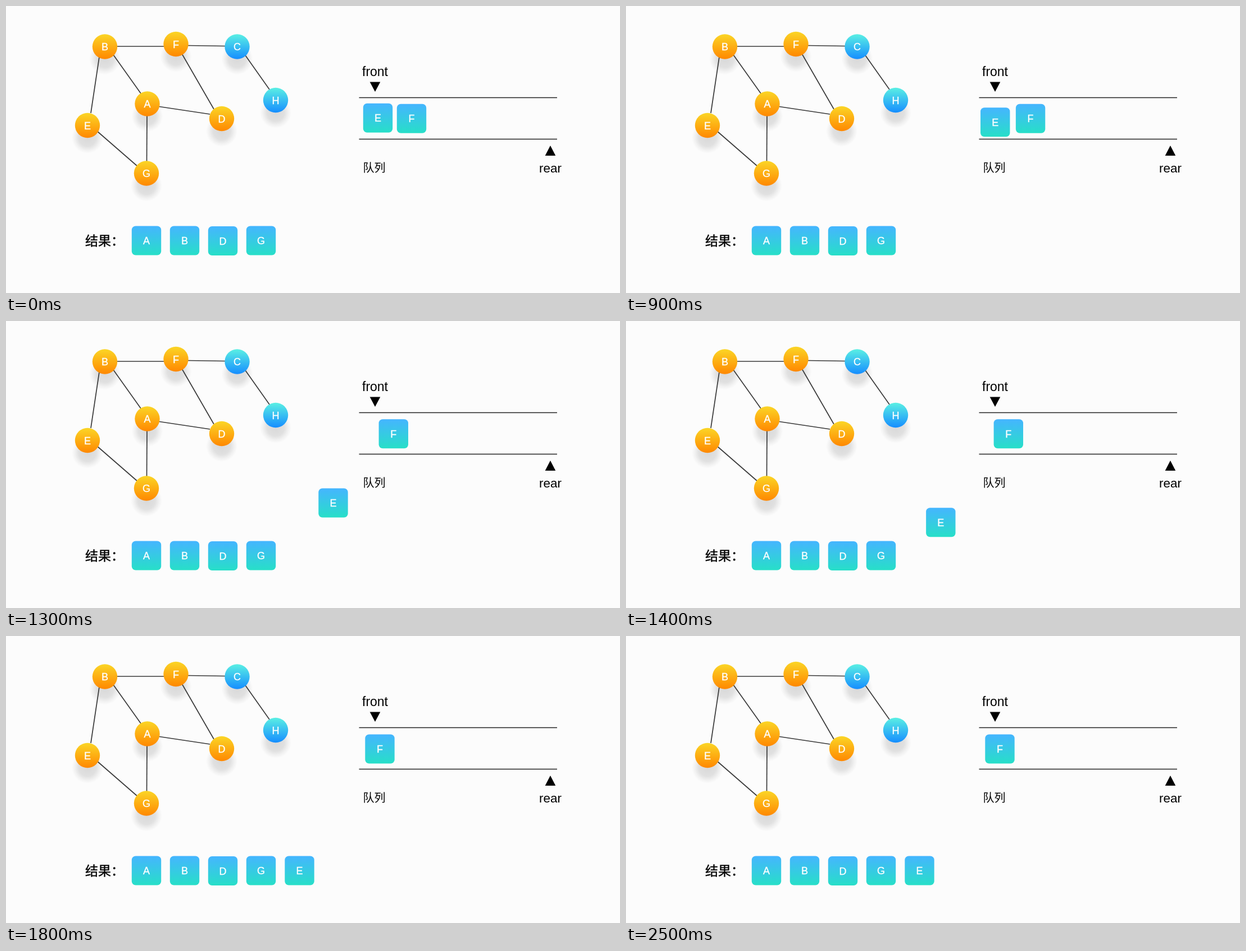
Animation, 1093 px wide and 512 px high, one loop 2.6 s. Source, as an HTML page with a canvas:

```html
<!DOCTYPE html>
<html lang="zh">
<head>
<meta charset="utf-8">
<title>BFS queue</title>
<style>
html, body { margin: 0; width: 100%; height: 100%; overflow: hidden; background: #fcfcfc; }
canvas { display: block; width: 1093px; height: 512px; }
</style>
</head>
<body>
<canvas id="stage" width="1093" height="512"></canvas>
<script>
const ctx = document.getElementById('stage').getContext('2d');
const LOOP = 2600, STEP = 100;
const MOVE_START = 789, MOVE_TIME = 938;
const LATIN = '"Liberation Sans", Arial, sans-serif';
const CJK = '"Noto Sans CJK SC", "Noto Sans CJK", sans-serif';
const ORANGE = ['#fbd526', '#ff8800'];
const BLUE = ['#5aefe4', '#168eff'];
const TILE = ['#45b5ff', '#27dfc8'];

const nodes = [
  ['B', 176, 72.5, ORANGE], ['F', 302.5, 68, ORANGE], ['C', 411.5, 72.5, BLUE],
  ['A', 251.5, 174.5, ORANGE], ['H', 480, 168, BLUE], ['D', 384, 201, ORANGE],
  ['E', 145, 213, ORANGE], ['G', 250, 298.5, ORANGE]
];
const edges = [
  [198, 72, 281, 72], [324, 70.5, 390, 71.5], [426, 88, 469, 149],
  [313, 85, 370, 184], [191, 87, 240, 156], [273, 179.5, 363, 193],
  [166, 91, 151, 191], [163, 224, 233, 285], [251, 196, 250.5, 277]
];
const results = [['A', 250, 418.5], ['B', 318, 418.5], ['D', 386, 419], ['G', 454, 418.5]];
const movers = [
  ['F', [722, 200.8], [665.5, 201.5]],
  ['E', [662, 199.8], [522.5, 418.5]]
];

function vertical([top, bottom], y, half) {
  const g = ctx.createLinearGradient(0, y - half, 0, y + half);
  g.addColorStop(0, top);
  g.addColorStop(1, bottom);
  return g;
}

function label(text, x, y, font, color, align, weight = 0) {
  ctx.font = font;
  ctx.textAlign = align;
  ctx.fillStyle = ctx.strokeStyle = color;
  ctx.fillText(text, x, y);
  if (weight) {
    ctx.lineWidth = weight;
    ctx.strokeText(text, x, y);
  }
}

function letter(ch, x, y) {
  label(ch, x, y + 6.5, '18px ' + LATIN, '#fff', 'center', 0.35);
}

function line(x1, y1, x2, y2, color, width) {
  ctx.strokeStyle = color;
  ctx.lineWidth = width;
  ctx.beginPath();
  ctx.moveTo(x1, y1);
  ctx.lineTo(x2, y2);
  ctx.stroke();
}

function shadow(x, y) {
  const g = ctx.createRadialGradient(x, y, 0, x, y, 28);
  g.addColorStop(0, 'rgba(0,0,0,.14)');
  g.addColorStop(0.55, 'rgba(0,0,0,.11)');
  g.addColorStop(0.8, 'rgba(0,0,0,.045)');
  g.addColorStop(1, 'rgba(0,0,0,0)');
  ctx.fillStyle = g;
  ctx.fillRect(x - 28, y - 28, 56, 56);
}

function node([ch, x, y, colors]) {
  ctx.fillStyle = vertical(colors, y, 22);
  ctx.beginPath();
  ctx.arc(x, y, 22.2, 0, Math.PI * 2);
  ctx.fill();
  letter(ch, x, y);
}

function tile(ch, x, y) {
  ctx.fillStyle = vertical(TILE, y, 26);
  ctx.beginPath();
  ctx.roundRect(x - 26.2, y - 26, 52.4, 52, 7);
  ctx.fill();
  letter(ch, x, y);
}

function triangle(x, base, tip) {
  ctx.fillStyle = '#000';
  ctx.beginPath();
  ctx.moveTo(x - 9.3, base);
  ctx.lineTo(x + 9.3, base);
  ctx.lineTo(x, tip);
  ctx.fill();
}

function ease(t) {
  const u = Math.min(1, Math.max(0, (t - MOVE_START) / MOVE_TIME));
  return (1 - Math.cos(Math.PI * u)) / 2;
}

function draw(t) {
  ctx.fillStyle = '#fcfcfc';
  ctx.fillRect(0, 0, 1093, 512);

  nodes.forEach(([, x, y]) => shadow(x, y + 22));
  edges.forEach(e => line(...e, '#3a3a3a', 1.7));
  nodes.forEach(node);

  label('front', 657, 125, '23px ' + LATIN, '#000', 'center');
  label('rear', 969, 296.5, '22.5px ' + LATIN, '#000', 'center');
  label('队列', 635.5, 296.3, '20px ' + CJK, '#000', 'left');
  label('结果：', 141, 427.2, '500 23px ' + CJK, '#000', 'left', 0.4);
  triangle(657, 135.5, 153);
  triangle(969, 267, 249);
  line(628.5, 163.6, 981, 163.6, '#222', 1.5);
  line(628.5, 237.6, 981, 237.6, '#222', 1.5);

  results.forEach(r => tile(...r));
  const k = ease(t);
  movers.forEach(([ch, a, b]) => tile(ch, a[0] + (b[0] - a[0]) * k, a[1] + (b[1] - a[1]) * k));
}

const start = performance.now();
function tick() {
  const t = (performance.now() - start) % LOOP;
  draw(Math.floor(t / STEP) * STEP);
  requestAnimationFrame(tick);
}
tick();
</script>
</body>
</html>
```
